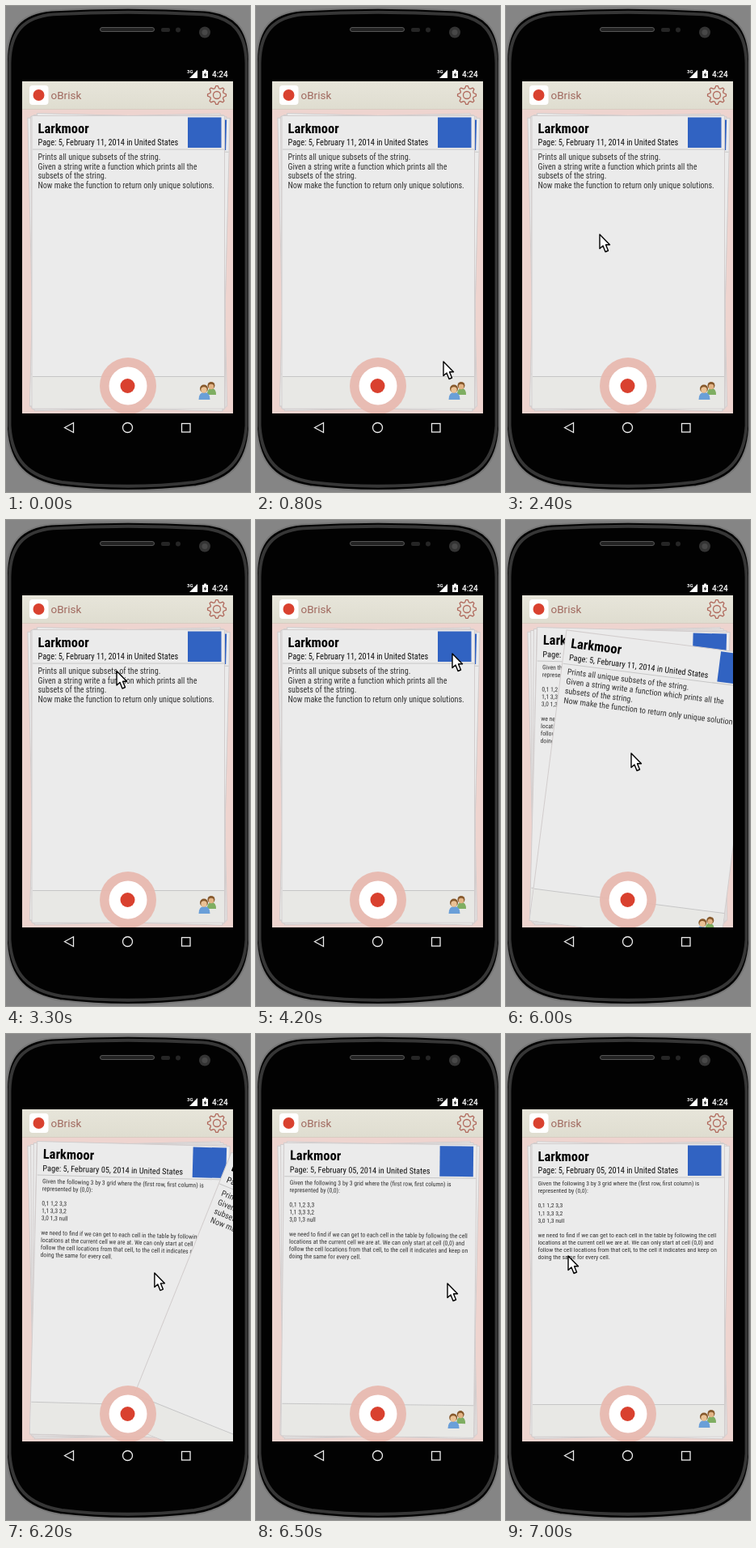
Animation of 302x600 px, one loop 7.1 s. Source, as an HTML page:

```html
<!DOCTYPE html>
<html lang="en">
<head>
<meta charset="utf-8">
<title>Card swipe demo</title>
<style>
  html, body { margin: 0; width: 100%; height: 100%; overflow: hidden; background: #858585; }
  svg { display: block; width: 302px; height: 600px; }
  text { font-family: "Roboto Condensed", Roboto, sans-serif; font-stretch: 75%; white-space: pre; }
  .title { font-size: 16.5px; font-weight: 700; }
  .page { font-size: 10.3px; fill: #111; }
  .body { fill: #333; }
  .wide { font-family: Roboto, sans-serif; font-stretch: 100%; }
</style>
</head>
<body>
<svg viewBox="0 0 302 600">
  <defs>
    <linearGradient id="bar" x2="0" y2="1">
      <stop offset="0" stop-color="#e7e5da"/><stop offset="1" stop-color="#dfddd0"/>
    </linearGradient>
    <clipPath id="screen"><path d="M20 128H281V503H20Z"/></clipPath>
    <path id="shell" d="M1 66C2 28 18 9 56 5.500Q151 0 246 5.500C284 9 300 28 301 66V522C298 566 277 586 235 593Q151 603 67 593C25 586 4 566 1 522Z"/>
    <g id="people">
      <path d="M249 480q0-8 5.500-8t5.500 8Z" fill="#7fae62"/>
      <circle cx="254" cy="468.500" r="4.500" fill="#86592c"/><circle cx="254" cy="470" r="3.200" fill="#e2b486"/>
      <path d="M238.500 486q0-9 7-9t7 9Z" fill="#6a9fd8"/>
      <circle cx="245" cy="472.500" r="5" fill="#86592c"/><circle cx="245" cy="474" r="3.700" fill="#ebc295"/>
    </g>
  </defs>

  <use href="#shell" fill="#020202" stroke="#777" stroke-width="2"/>
  <use href="#shell" fill="none" stroke="#363636" stroke-width="4" transform="translate(3.500 5) scale(.977 .983)"/>
  <rect x="116.500" y="26.500" width="67" height="5" rx="2.500" fill="#222" stroke="#555"/>
  <rect x="192" y="27" width="11" height="5" rx="2" fill="#252525"/>
  <circle cx="213" cy="29.500" r="3" fill="#252525"/>
  <circle cx="246" cy="32.500" r="7" fill="#343434"/><circle cx="246" cy="32.500" r="3.500" fill="#484848"/>

  <g fill="#fff">
    <text class="wide" x="224" y="83" font-size="6" font-weight="700">3G</text>
    <path d="M227 89L237 79V89Z"/>
    <path d="M243 80h2v-1.500h3V80h2v9h-7Z"/>
    <path d="M247.500 81.500l-3 4h2l-1 2.500 3-3.500h-2Z" fill="#000"/>
    <text class="wide" x="255" y="88" font-size="10" font-weight="500">4:24</text>
  </g>

  <rect x="20" y="93" width="261" height="410" fill="#eed4cf"/>
  <g clip-path="url(#screen)">
    <g id="sheets"></g>
    <g id="cards"></g>
    <circle cx="151" cy="469" r="35" fill="#e9b9af" fill-opacity=".92"/>
    <circle cx="151" cy="469" r="23.500" fill="#fff"/>
    <circle cx="150.500" cy="469" r="9" fill="#d9412f"/>
  </g>

  <rect x="20" y="93" width="261" height="34" fill="url(#bar)"/>
  <path d="M20 127.500H281" stroke="#d7cbc0"/>
  <rect x="29" y="98" width="23.500" height="24" rx="4" fill="#fff"/>
  <circle cx="40.500" cy="110" r="7" fill="#d9412f"/>
  <text class="wide" x="55.500" y="115" font-size="13.500" fill="#a0695f">oBrisk</text>
  <g transform="translate(261 110)" fill="none" stroke="#b0695c" stroke-width="1.300" stroke-linejoin="round">
    <path id="gear"/><circle r="4.500"/>
  </g>

  <g fill="none" stroke="#eee" stroke-width="1.300">
    <path d="M72.500 520.500L83.500 514.500V526.500Z"/>
    <circle cx="150.500" cy="520.500" r="6"/>
    <rect x="217.500" y="515.500" width="10.500" height="10.500"/>
  </g>
  <path id="cursor" d="M0 0V17.500L4 14L7 21.500L10.500 20L7.500 12.800H12.500Z" fill="#fff" stroke="#000" stroke-width="1.400" stroke-linejoin="round"/>
</svg>

<script>
const $ = id => document.getElementById(id);
const LOOP = 7100, STEP = 100, DRAG = 5900, SETTLED = 6700;
const clamp = k => Math.min(1, Math.max(0, k));
const smooth = k => k * k * (3 - 2 * k);

const sheet = '<rect x="32" y="135.5" width="238.5" height="361.5" fill="#ebebeb" stroke="#d2cdcd"/>';
const pose = (x, y, turn) => `translate(${x} ${y}) rotate(${turn} 151 316)`;

function card(id, date, size, leading, body) {
  const lines = body.split('\n').map((line, i) =>
    `<text class="body" x="39.5" y="${179.5 + size + i * leading}" font-size="${size}">${line}</text>`);
  return `<g id="${id}">${sheet}
    <path d="M33 458H270V496.500H33Z" fill="#e8e8e5"/>
    <path d="M33 177H270M33 457.500H270" stroke="#c6c6c6"/>
    <text class="title" x="39.500" y="156.500">Larkmoor</text>
    <text class="page" x="39.500" y="172">Page: 5, February ${date}, 2014 in United States</text>
    <rect x="225" y="137.500" width="41.500" height="37.500" fill="#3163c2"/>
    ${lines.join('')}<use href="#people"/></g>`;
}

// Blank sheets fanned out evenly beneath the cards
for (let i = 0; i < 4; i++) {
  $('sheets').innerHTML += `<g transform="${pose(i - 1, 0, (i - 1.5) * .9)}">${sheet}</g>`;
}

$('cards').innerHTML = card('next', '05', 7.7, 9.08,
`Given the following 3 by 3 grid where the (first row, first column) is
represented by (0,0):

0,1 1,2 3,3
1,1 3,3 3,2
3,0 1,3 null

we need to find if we can get to each cell in the table by following the cell
locations at the current cell we are at. We can only start at cell (0,0) and
follow the cell locations from that cell, to the cell it indicates and keep on
doing the same for every cell.`) + card('top', '11', 10.15, 11.9,
`Prints all unique subsets of the string.
Given a string write a function which prints all the
subsets of the string.
Now make the function to return only unique solutions.`);

$('gear').setAttribute('d', 'M' + Array.from({ length: 32 }, (_, i) => {
  const r = i % 4 < 2 ? 11.5 : 8.6, a = (i - .5) * Math.PI / 16;
  return `${(r * Math.cos(a)).toFixed(2)} ${(r * Math.sin(a)).toFixed(2)}`;
}).join('L') + 'Z');

// Stops of the pointer: time, x, y
const stops = [
  [400, 300, 560], [800, 232, 439], [1000, 150, 465], [1600, 255, 110], [2400, 116, 282],
  [3000, 45, 190], [3600, 229, 183], [4200, 243, 165], [5300, 136, 274],
  [DRAG, 136, 274], [6000, 155, 288], [6500, 237, 308], [7000, 77, 274]
];

function pointer(t) {
  const i = Math.max(1, stops.findIndex(([time]) => time >= t));
  const [t0, x0, y0] = stops[i - 1], [t1, x1, y1] = stops[i];
  const k = smooth(clamp((t - t0) / (t1 - t0)));
  return [x0 + (x1 - x0) * k, y0 + (y1 - y0) * k];
}

function draw() {
  const t = Math.floor(performance.now() % LOOP / STEP) * STEP;
  const [x, y] = pointer(t);
  $('cursor').setAttribute('transform', `translate(${x} ${y})`);
  $('cursor').style.display = t < stops[0][0] ? 'none' : '';

  // The top card accelerates away while the next one straightens
  const pull = Math.max(0, t - DRAG) / 100;
  const tilt = clamp((SETTLED - t) / 500);
  $('top').setAttribute('transform', pose(19 * pull ** 2, 14 * pull, 7.3 * pull));
  $('top').style.display = pull > 5 ? 'none' : '';
  $('next').setAttribute('transform', pose(2 * tilt, 0, 1.5 * tilt));
  requestAnimationFrame(draw);
}
draw();
</script>
</body>
</html>
```
